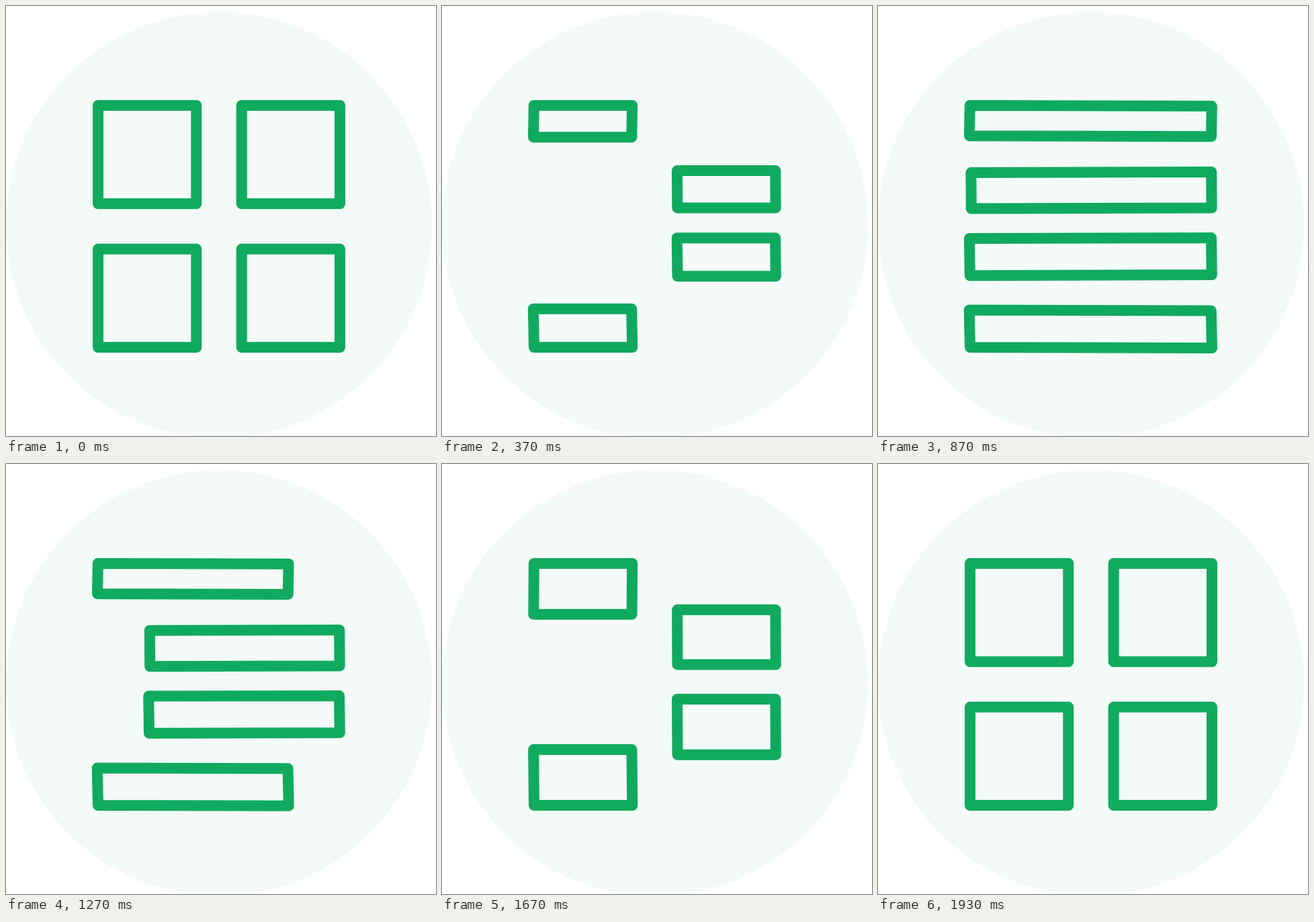
An HTML page with a canvas that plays this animation: 640 px wide and 640 px high, repeating every 2 s.

```html
<!DOCTYPE html>
<html lang="en">
<head>
<meta charset="utf-8">
<title>Grid to list</title>
<style>
  html, body { margin: 0; width: 100%; height: 100%; overflow: hidden; background: #fff; }
  canvas { display: block; width: 640px; height: 640px; }
</style>
</head>
<body>
<canvas id="stage" width="640" height="640"></canvas>
<script>
const ctx = document.getElementById('stage').getContext('2d');
const LOOP = 2000;
const SIZE = 146.3;  // side of a square tile
const DRIFT = 0.6;   // a squeezed bar slips left
const SAG = 1.1;     // a stretched bar droops at its free end

// A tile at y squeezes to top..bottom, then stretches from near to far.
const boxes = [
  { near: 137, far: 497, y: 148, top: 148, bottom: 193.2, lean: -0.4 },
  { near: 497, far: 139.2, y: 148, top: 247, bottom: 300.5, lean: 0.2 },
  { near: 497, far: 137, y: 361.8, top: 344.9, bottom: 400.1, lean: 0.4 },
  { near: 137, far: 497, y: 361.8, top: 452.5, bottom: 508, lean: 0.6 }
];

const mix = (a, b, p) => a + (b - a) * p;

// Progress of an ease-in-out between two ticks.
function ease(tick, from, to) {
  const x = Math.min(1, Math.max(0, (tick - from) / (to - from)));
  return x * x * (3 - 2 * x);
}

// 30 ticks per second, on a 10 ms clock.
const tickAt = ms => Math.floor((3 * Math.floor(ms / 10) + 1) / 10);

function drawBox(box, squeeze, stretch) {
  const { near, far } = box;
  const free = mix(near + Math.sign(far - near) * SIZE, far, stretch);
  const top = mix(box.y, box.top, squeeze);
  const bottom = mix(box.y + SIZE, box.bottom, squeeze);
  const sag = SAG * stretch;
  const upper = -(DRIFT + box.lean) * squeeze;
  const lower = -(DRIFT - box.lean) * squeeze;

  ctx.beginPath();
  ctx.moveTo(near + upper, top);
  ctx.lineTo(free + upper, top + sag);
  ctx.lineTo(free + lower, bottom + sag);
  ctx.lineTo(near + lower, bottom);
  ctx.closePath();
  ctx.stroke();
}

function draw(ms) {
  const tick = tickAt(ms % LOOP);
  const squeeze = ease(tick, 0, 12) - ease(tick, 45.4, 58);
  const stretch = ease(tick, 12, 26) - ease(tick, 33, 45.4);

  ctx.fillStyle = '#fff';
  ctx.fillRect(0, 0, 640, 640);
  ctx.fillStyle = '#f3faf8';
  ctx.beginPath();
  ctx.arc(317, 326, 317, 0, Math.PI * 2);
  ctx.fill();

  ctx.strokeStyle = '#10aa5e';
  ctx.lineWidth = 16;
  ctx.lineJoin = 'round';
  for (const box of boxes) drawBox(box, squeeze, stretch);
}

const start = performance.now();
function loop() {
  draw(performance.now() - start);
  requestAnimationFrame(loop);
}
loop();
</script>
</body>
</html>
```
